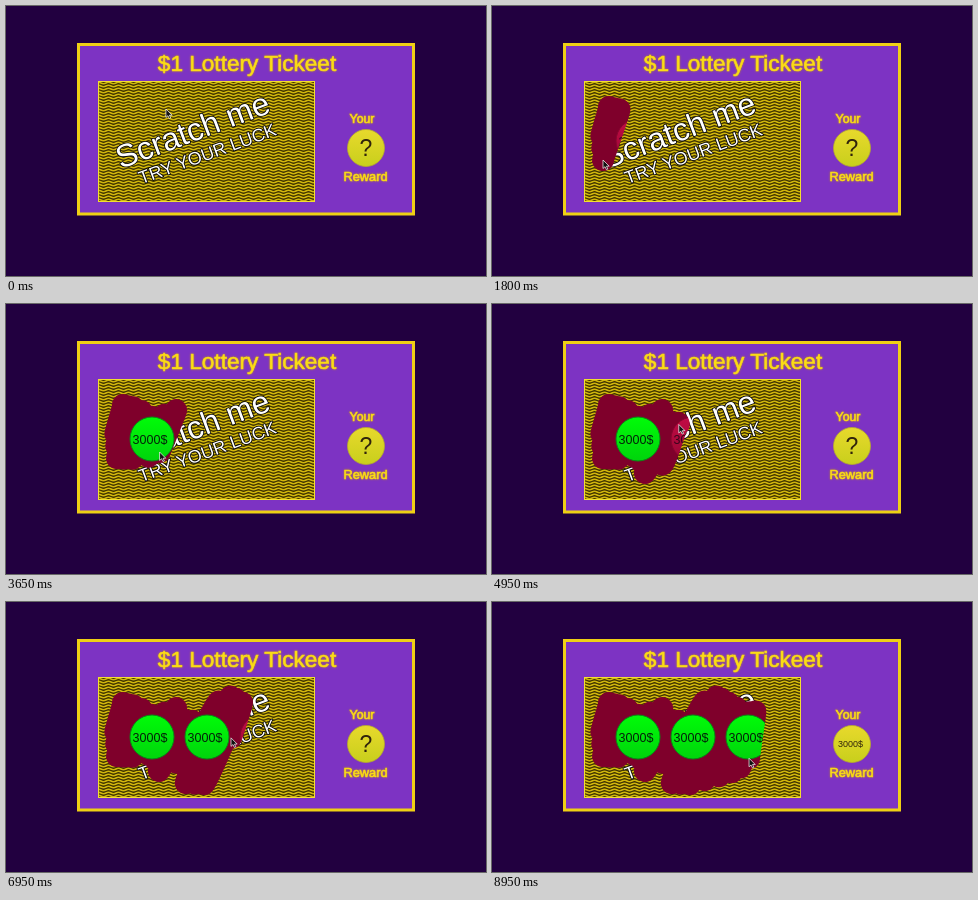
These frames come from a looping animation (480 by 270 pixels, 9 s). An HTML page:

```html
<!DOCTYPE html>
<html lang="en">
<head>
<meta charset="utf-8">
<title>Lottery ticket</title>
<style>
  html, body { margin: 0; width: 100%; height: 100%; overflow: hidden; background: #220040; }
  svg { display: block; font-family: "Liberation Sans", Arial, sans-serif; text-anchor: middle; }
  .gold { fill: #fbdc16; stroke: #fbdc16; stroke-width: .6; filter: drop-shadow(0 0 1px #b98a2c); }
  .foil-text { fill: #fff; stroke: #000; stroke-width: 1.6; paint-order: stroke; stroke-linejoin: round; }
  .prize { fill: url(#red); stroke: #85052e; }
  .won .prize { fill: url(#green); stroke: #078a16; }
  .amount { font-size: 12.5px; fill: #38051c; }
  .won .amount { fill: #04230a; }
</style>
</head>
<body>
<svg width="480" height="270" viewBox="0 0 480 270">
  <defs>
    <linearGradient id="red" x2="0" y2="1">
      <stop stop-color="#c20b45"/><stop offset="1" stop-color="#980733"/>
    </linearGradient>
    <linearGradient id="green" x2="0" y2="1">
      <stop stop-color="#00fc08"/><stop offset="1" stop-color="#00d40c"/>
    </linearGradient>
    <linearGradient id="yellow" x2="0" y2="1">
      <stop stop-color="#e8d92c"/><stop offset="1" stop-color="#c8cf1c"/>
    </linearGradient>
    <clipPath id="panel"><rect x="93" y="76" width="215" height="119"/></clipPath>
    <mask id="scratched" maskUnits="userSpaceOnUse" x="0" y="0" width="480" height="270">
      <rect width="480" height="270" fill="#fff"/>
      <polyline id="scratch" fill="none" stroke="#000" stroke-width="22" stroke-linecap="round" stroke-linejoin="round"/>
    </mask>
  </defs>

  <rect width="480" height="270" fill="#220040"/>
  <rect x="72.5" y="38.5" width="335" height="169.5" fill="#7d33c3" stroke="#efd014" stroke-width="3"/>
  <text class="gold" x="241" y="65" font-size="22.6">$1 Lottery Tickeet</text>

  <rect x="92.5" y="75.5" width="216" height="120" fill="#7f002b" stroke="#f2df30"/>
  <g id="prizes"></g>
  <g clip-path="url(#panel)">
    <g mask="url(#scratched)">
      <rect x="92" y="75" width="217" height="121" fill="#3a2f00"/>
      <path id="waves" fill="none" stroke="#d0b60c" stroke-width="1.6"/>
      <g class="foil-text">
        <text transform="translate(190.5 134.5) rotate(-20.7)" font-size="32">Scratch me</text>
        <text transform="translate(203.5 153.5) rotate(-20)" font-size="18">TRY YOUR LUCK</text>
      </g>
    </g>
  </g>

  <text class="gold" x="356" y="117" font-size="12.3">Your</text>
  <circle cx="360" cy="142" r="18.5" fill="url(#yellow)" stroke="#b5ab2c" stroke-width=".8"/>
  <text id="reward" x="360" fill="#30230c"></text>
  <text class="gold" x="359.5" y="175" font-size="12.8">Reward</text>

  <path id="cursor" d="M0 0V8.5L2 6.7L3.4 9.6L4.8 9L3.5 6.2H6.2Z" fill="#111" stroke="#fff" stroke-width=".7"/>
</svg>

<script>
const LOOP = 9000, TOUCH = 600, SWING = 240, SAMPLE = 30;
const AMOUNT = "3000$";
const REVEALS = [3200, 5800, 8700];

// The hand rubs between an upper and a lower turning point that drift across the panel
const DRIFT = [
  { t: 0, top: [160, 103], bottom: [160, 103] },
  { t: TOUCH, top: [117, 101], bottom: [109, 124] },
  { t: 1800, top: [130, 104], bottom: [111, 154] },
  { t: 2700, top: [150, 115], bottom: [124, 155] },
  { t: 3400, top: [170, 105], bottom: [148, 152] },
  { t: 4200, top: [172, 116], bottom: [153, 169] },
  { t: 4950, top: [187, 119], bottom: [180, 156] },
  { t: 5550, top: [221, 93], bottom: [178, 181] },
  { t: 6600, top: [232, 98], bottom: [198, 182] },
  { t: 7850, top: [253, 111], bottom: [236, 172] },
  { t: LOOP, top: [266, 109], bottom: [257, 161] },
];

const get = id => document.getElementById(id);
const scratch = get("scratch"), cursor = get("cursor"), reward = get("reward");
const mix = (a, b, f) => a.map((v, k) => v + (b[k] - v) * f);

get("prizes").innerHTML = REVEALS.map((_, i) => {
  const x = 146 + i * 55;
  return `<g><circle class="prize" cx="${x}" cy="135" r="22"/>
    <text class="amount" x="${x - 2}" y="139.5">${AMOUNT}</text></g>`;
}).join("");
const prizes = [...get("prizes").children];

let waves = "";
for (let y = 74; y < 198; y += 3) {
  waves += `M90 ${y}q2.5 -1.4 5 0` + "t5 0".repeat(44);
}
get("waves").setAttribute("d", waves);

function pointerAt(t) {
  const i = DRIFT.findIndex(key => key.t > t);
  const from = DRIFT[i - 1], to = DRIFT[i];
  const f = (t - from.t) / (to.t - from.t);
  const swing = (1 - Math.cos(Math.PI * Math.max(0, t - TOUCH) / SWING)) / 2;
  return mix(mix(from.top, to.top, f), mix(from.bottom, to.bottom, f), swing);
}

function draw(t) {
  const tip = pointerAt(t), trail = [];
  for (let s = TOUCH; s < t; s += SAMPLE) trail.push(pointerAt(s));
  if (trail.length) trail.push(tip);
  scratch.setAttribute("points", trail.join(" "));
  cursor.setAttribute("transform", `translate(${tip})`);
  prizes.forEach((p, i) => p.classList.toggle("won", t >= REVEALS[i]));

  const done = t >= REVEALS[2];
  reward.textContent = done ? AMOUNT : "?";
  reward.setAttribute("font-size", done ? 9 : 23);
  reward.setAttribute("y", done ? 145 : 150);
  reward.setAttribute("x", done ? 358.5 : 360);
}

const start = performance.now();
function tick() {
  draw((performance.now() - start) % LOOP);
  requestAnimationFrame(tick);
}
tick();
</script>
</body>
</html>
```
